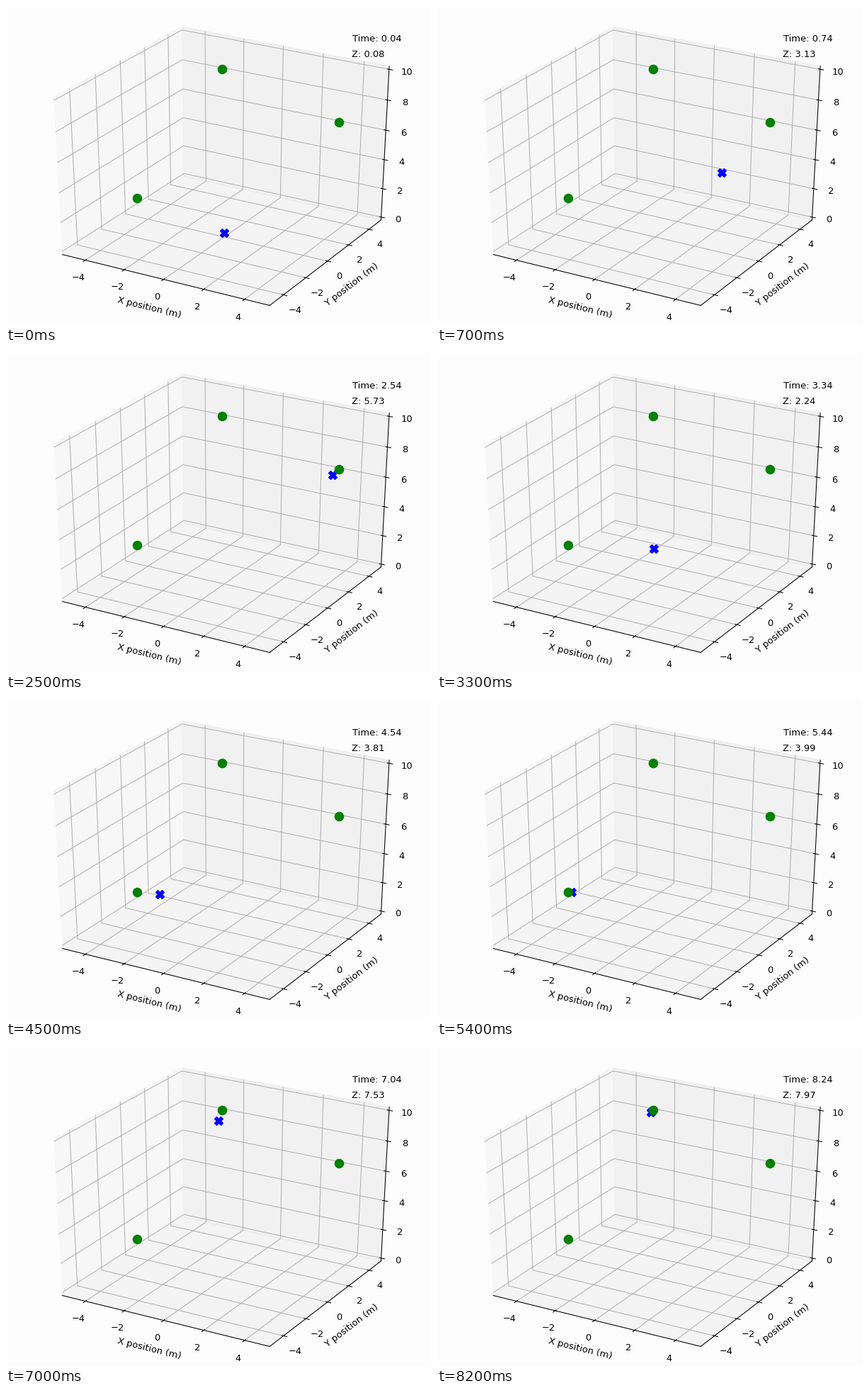
Animation, 600 px wide and 450 px high, one loop 8300 ms. Source, as a matplotlib script:

```python
import numpy as np
import matplotlib.pyplot as plt
from matplotlib.animation import FuncAnimation
from mpl_toolkits.mplot3d import Axes3D

FRAMES, INTERVAL = 83, 100
T0, DT = 0.04, 0.1
DIST = 10
MARKER = 9.4
BACKGROUND = "#fefdfe"
TARGETS = np.array([(3, 5, 6), (-2, -4, 4), (-3, 5, 8)])

# Key points of the flight: time -> (x, y, z)
PATH = {
    0.04: (0, 0, 0.08),
    1.54: (2.85, 5.36, 5.56),
    2.40: (2.97, 5.06, 5.95),
    3.34: (-0.07, -0.02, 2.24),
    4.54: (-1.18, -3.49, 3.81),
    5.44: (-1.88, -3.91, 3.99),
    6.34: (-2.5, 2.5, 6),
    7.04: (-2.89, 4.5, 7.53),
    8.24: (-2.97, 4.78, 7.97),
}


class WideAxes3D(Axes3D):
    """3D axes showing a unit cube stretched over the whole figure."""

    def apply_aspect(self, position=None):
        pass

    def get_proj(self):
        super().get_proj()
        elev, azim = np.radians([30, -60])
        se, ce, sa, ca = np.sin(elev), np.cos(elev), np.sin(azim), np.cos(azim)
        world = np.diag([0.1, 0.1, 0.1, 1.0])
        world[2, 3] = -0.5
        view = np.array([
            [-sa, ca, 0, 0],
            [-ca * se, -sa * se, ce, 0],
            [ca * ce, sa * ce, se, -DIST],
            [0, 0, 0, 1],
        ])
        persp = np.diag([1.0, 1.0, 0.0, 0.0])
        persp[2, 3] = -DIST
        persp[3, 2] = -1
        return persp @ view @ world


def monotone_slopes(times, points):
    """Harmonic mean of neighbouring speeds, zero where the motion turns."""
    speed = np.diff(points, axis=0) / np.diff(times)[:, None]
    before, after = speed[:-1], speed[1:]
    same = before * after > 0
    total = np.where(same, before + after, 1)
    inner = np.where(same, 2 * before * after / total, 0)
    return np.vstack([speed[0], inner, np.zeros(3)])


times = np.array(list(PATH))
points = np.array(list(PATH.values()), dtype=float)
slopes = monotone_slopes(times, points)


def position(t):
    """Smooth cubic motion through the key points."""
    i = int(np.clip(np.searchsorted(times, t) - 1, 0, len(times) - 2))
    h = times[i + 1] - times[i]
    u = (t - times[i]) / h
    ease = u * u * (3 - 2 * u)
    return ((1 - ease) * points[i] + ease * points[i + 1]
            + u * (1 - u) ** 2 * h * slopes[i]
            - u * u * (1 - u) * h * slopes[i + 1])


fig = plt.figure(figsize=(6.4, 4.8), dpi=93.75, facecolor=BACKGROUND)
ax = WideAxes3D(fig, [0, 0, 1, 1], facecolor=BACKGROUND)
fig.add_axes(ax)

drone, = ax.plot([0], [0], [0], "X", color="blue", ms=MARKER)
ax.plot(*TARGETS.T, "o", color="green", ms=MARKER)
time_text = ax.text(4, 4, 12, "")
z_text = ax.text(4, 4, 11, "")

for set_lim, low in ((ax.set_xlim, -5), (ax.set_ylim, -5), (ax.set_zlim, 0)):
    set_lim(low, low + 10, view_margin=1 / 48)
ax.set_xticks(range(-4, 5, 2))
ax.set_yticks(range(-4, 5, 2))
ax.set_zticks(range(0, 11, 2))
ax.set_xlabel("X position (m)")
ax.set_ylabel("Y position (m)")


def update(frame):
    t = T0 + DT * frame
    x, y, z = position(t)
    drone.set_data_3d([x], [y], [z])
    time_text.set_text(f"Time: {t:.2f}")
    z_text.set_text(f"Z: {z:.2f}")
    return drone, time_text, z_text


anim = FuncAnimation(fig, update, frames=FRAMES, interval=INTERVAL,
                     repeat=True, repeat_delay=0, blit=False)
plt.show()
```
